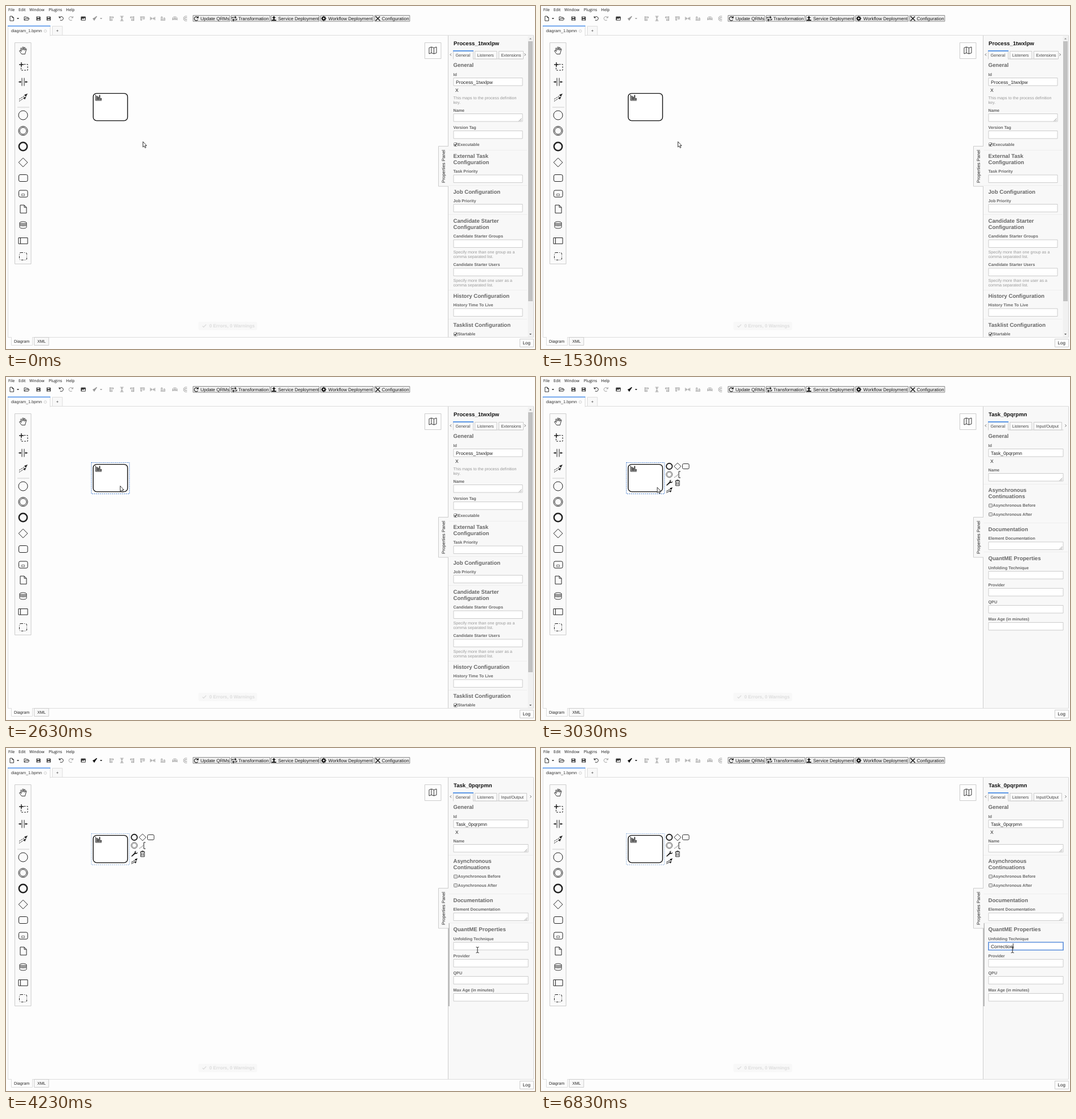
These frames come from a looping animation (929x603 px, 7.06 s). An HTML page with a canvas:

```html
<!DOCTYPE html>
<html>
<head>
<meta charset="utf-8">
<style>
html, body { margin: 0; width: 100%; height: 100%; overflow: hidden; background: #fdfdfd; }
canvas { display: block; }
</style>
</head>
<body>
<canvas id="stage" width="929" height="603"></canvas>
<script>
const ctx = document.getElementById('stage').getContext('2d');
ctx.textRendering = 'geometricPrecision';
const LOOP = 7060, SELECT = 2830, FOCUS = 4600;
const TYPED = 'Correction';
const KEY_TIMES = [5300, 5530, 5600, 5800, 6000, 6170, 6370, 6500, 6600, 6770];
const SANS = '"Liberation Sans", Arial, sans-serif';
const BLUE = '#4d90ea';

function text(str, x, y, { size = 7.2, color = '#333', bold = false, font = SANS } = {}) {
  ctx.font = `${bold ? 'bold ' : ''}${size}px ${font}`;
  ctx.fillStyle = color;
  ctx.fillText(str, x, y + size * 0.36);
}

function box(x, y, w, h, { fill, stroke, line = 1, radius = 0, dash = [] } = {}) {
  ctx.beginPath();
  ctx.roundRect(x, y, w, h, radius);
  if (fill) { ctx.fillStyle = fill; ctx.fill(); }
  if (!stroke) return;
  ctx.strokeStyle = stroke;
  ctx.lineWidth = line;
  ctx.setLineDash(dash);
  ctx.stroke();
  ctx.setLineDash([]);
}

function icon(x, y, d, { stroke = '#222', fill, line = 1, dash = [] } = {}) {
  const path = new Path2D(d);
  ctx.save();
  ctx.translate(x, y);
  if (fill) { ctx.fillStyle = fill; ctx.fill(path); }
  if (line) {
    ctx.strokeStyle = stroke;
    ctx.lineWidth = line;
    ctx.setLineDash(dash);
    ctx.stroke(path);
  }
  ctx.restore();
}

const solid = (x, y, d, fill = '#222') => icon(x, y, d, { fill, line: 0 });

function ring(x, y, r, line = 1, stroke = '#222') {
  ctx.beginPath();
  ctx.arc(x, y, r, 0, 7);
  ctx.strokeStyle = stroke;
  ctx.lineWidth = line;
  ctx.stroke();
}

const diamond = r => `M0 ${-r}L${r} 0L0 ${r}L${-r} 0Z`;
const CARET = 'M-2 -1H2L0 1.2Z';
const WRENCH = 'M-5 4L1 -2Q0 -5 4 -5L2 -3L4 -1L6 -3Q6 1 2 0L-4 5Z';

function drawMenuAndToolbar(selected) {
  [['File', 4], ['Edit', 22], ['Window', 41], ['Plugins', 75], ['Help', 105.5]].forEach(([label, x]) =>
    text(label, x, 6, { size: 7, color: '#111', font: '"Open Sans", sans-serif' }));

  icon(10, 22, 'M-3 -4H1L3.5 -1.5V4H-3ZM1 -4V-1.5H3.5', { line: 0.9 });
  solid(21, 22, CARET);
  icon(36, 22, 'M-4 3V-3H-1L0 -2H3V0M-4 3L-2 0H5L3 3Z', { line: 0.9 });
  for (const x of [57, 75]) {
    solid(x, 22, 'M-3.5 -3.5H2.5L3.5 -2.5V3.5H-3.5Z', '#333');
    solid(x, 22, 'M-2 -2.7H1.5V-.8H-2ZM-2 1H2V2.8H-2Z', '#ddd');
  }
  const undo = 'M-3 -1.5A3.4 3.4 0 1 1 -2 2.6M-3.6 -4V-1.2H-.8';
  icon(97, 22, undo);
  ctx.save();
  ctx.translate(114, 22);
  ctx.scale(-1, 1);
  icon(0, 0, undo, { stroke: '#999' });
  ctx.restore();
  box(131.5, 18.5, 8.5, 7, { fill: '#333', radius: 1 });
  solid(136, 22, 'M-3.5 2.5L-1.5 -.5L0 1L2 -1.5L3.5 2.5Z', '#fff');
  const brush = selected ? '#111' : '#999';
  solid(156, 22, 'M-4 0L0 -2L3 -4.5L4 -3.5L1.5 0L-1 4Z', brush);
  solid(167, 22, CARET, brush);

  const faint = { stroke: '#999', line: 0.9 };
  ['M-3 -4V4M-3 -3H3V-1H-3M-3 1.5H1V3.5H-3', 'M-3 -4H3M-3 4H3M-2 -2H2M-2 2H2M0 -4V4',
   'M3 -4V4M3 -3H-3V-1H3M3 1.5H-1V3.5H3', 'M-4 -3H4M-3 -3V3H-1V-3M1.5 -3V1H3.5V-3',
   'M-4 -3V3M4 -3V3M-2 -2V2M2 -2V2M-4 0H4', 'M-4 3H4M-3 3V-3H-1V3M1.5 3V-1H3.5V3']
    .forEach((d, i) => icon(185.5 + i * 18, 22, d, faint));
  icon(296.5, 22, 'M-4 3V-1L-2 -3H2L4 -1V3M-1.5 3V-1H1.5V3M-4 1H4', faint);
  icon(315, 22, 'M3 -4H-1L-3 -2V2L-1 4H3M3 -1.5H-1V1.5H3', faint);

  [[328.5, 64.5, 'Update QRMs', 341.5], [395.5, 68, 'Transformation', 408], [465.5, 84.5, 'Service Deployment', 478],
   [552.5, 92.5, 'Workflow Deployment', 566], [647.5, 61.5, 'Configuration', 660]].forEach(([x, w, label, tx]) => {
    box(x, 16.5, w, 10.5, { fill: '#efefef', stroke: '#8a8a8a' });
    text(label, tx, 22, { size: 8, color: '#111' });
  });
  icon(334, 22, 'M3 -1.5A3.4 3.4 0 1 0 3 2M3.6 -4V-1.2H.8', { line: 1.2 });
  icon(401, 22, 'M-4 0V-2H3M1 -4L3 -2L1 0M4 0V2.5H-3M-1 .5L-3 2.5L-1 4.5', { line: 1.2 });
  solid(470.5, 22, 'M0 -4.5L3.3 -1H1.2V2H-1.2V-1H-3.3ZM-4 2H4V4H-4Z');
  ring(558, 22, 2.4, 2, '#111');
  icon(558, 22, 'M0 -4.5V-2.5M0 4.5V2.5M-4.5 0H-2.5M4.5 0H2.5M-3 -3L-2 -2M3 3L2 2M-3 3L-2 2M3 -3L2 -2', { line: 1.7 });
  icon(653, 22, 'M-4 -4L4 4M-4 4L3.5 -3.5', { line: 1.6 });
}

function drawFrame() {
  box(3.5, 51.5, 923, 531, { stroke: '#ddd' });
  box(3.5, 35.5, 74, 17, { fill: '#fdfdfd', stroke: '#ddd' });
  box(3, 34.5, 75, 1.6, { fill: BLUE });
  box(4, 51, 73, 2, { fill: '#fdfdfd' });
  text('diagram_1.bpmn', 9, 43.5);
  ring(69, 44, 2.2, 0.7, '#bbb');
  box(81.5, 35.5, 17.5, 16, { fill: '#f8f8f8', stroke: '#ddd' });
  text('+', 88, 43.5, { size: 7.5 });

  box(9.5, 582.5, 37, 14, { fill: '#fdfdfd', stroke: '#ddd' });
  box(10, 581.5, 36, 2, { fill: '#fdfdfd' });
  text('Diagram', 14, 589.5, { color: '#222' });
  box(49.5, 582.5, 25.5, 14, { fill: '#f8f8f8', stroke: '#ccc' });
  text('XML', 55, 589.5, { color: '#222' });
  box(902.5, 585.5, 24, 14, { fill: '#fdfdfd', stroke: '#ccc' });
  text('Log', 907.5, 592.5, { size: 8, color: '#222' });

  box(338, 555, 103, 15, { fill: '#f8f8f8', radius: 3 });
  icon(348, 562.5, 'M-3 0L-1 2L3.5 -2.5', { stroke: '#ddd', line: 1.5 });
  text('0 Errors, 0 Warnings', 357, 562.5, { size: 8.2, color: '#ddd', bold: true });

  box(735.5, 64.5, 28.5, 28, { fill: '#fdfdfd', stroke: '#ccc' });
  icon(749.5, 78, 'M-6.5 -4.5L-2.5 -6L2 -4.5L6.5 -6V4.5L2 6L-2.5 4.5L-6.5 6ZM-2.5 -6V4.5M2 -4.5V6', { line: 0.9 });
}

function drawPalette() {
  box(15.5, 64.5, 28.5, 389, { fill: '#fafafa', stroke: '#ccc' });
  const x = 30;
  icon(x, 78, 'M-2.5 6.5L-6.5 1Q-6 -1 -4 .5L-3 2L-4.5 -3.5Q-3.5 -5.5 -2.5 -3.5L-1.5 -.5L-1 -5.5Q0 -7 .8 -5.5V-.7L2 -5Q3.4 -6 3.6 -4.5L3 0L4.5 -2.5Q6 -3.5 6 -2L4 4L3.5 6.5Z', { line: 0.9 });
  icon(x, 106, 'M-3.5 -3.5H8V7H-3.5Z', { line: 1, dash: [3, 2] });
  icon(x, 106, 'M-3 -7V1M-7 -3H1', { line: 1.4 });
  icon(x, 133.5, 'M-2 -7V7M2 -7V7M-8 0H-3M8 0H3', { line: 1 });
  solid(x, 133.5, 'M-3 0L-6 -2V2ZM3 0L6 -2V2Z');
  icon(x, 161, 'M-7 3L4 -4M-7 6.5L3 0', { line: 0.9, dash: [3, 1] });
  solid(x, 161, 'M8 -7L5 -1.5L2 -5ZM5.5 -1.5L3 3.5L.5 0Z');
  box(20, 177.5, 21, 1, { fill: '#ccc' });
  ring(x, 192, 8);
  ring(x, 219.5, 8);
  ring(x, 219.5, 6);
  ring(x, 247, 7.2, 2.5);
  icon(x, 275, diamond(7.8));
  box(22.5, 296.5, 15.5, 12, { stroke: '#222', radius: 2.5 });
  box(22.5, 324, 15.5, 12, { stroke: '#222', radius: 2.5 });
  box(27.5, 330.5, 5, 3, { stroke: '#555', line: 0.8 });
  icon(x, 357, 'M-5 -7H2L6 -3V7H-5ZM2 -7V-3H6');
  icon(x, 385, 'M-6 -4Q-6 -6 0 -6T6 -4V4Q6 6 0 6T-6 4ZM-6 -4Q-6 -2.5 0 -2.5T6 -4M-6 -2Q-6 -.5 0 -.5T6 -2M-6 0Q-6 1.5 0 1.5T6 0', { line: 0.9 });
  box(22, 407.5, 16, 10.5, { stroke: '#222' });
  box(25, 407.5, 1, 10.5, { fill: '#222' });
  box(23.5, 433.5, 13, 13, { stroke: '#222', radius: 2.5, dash: [4, 2, 1, 2] });
}

function drawTask(selected, hovered) {
  box(153.2, 153.6, 60.3, 48, { fill: '#fff', stroke: '#111', line: 1.4, radius: 6 });
  icon(162.5, 161, 'M-5 -5V5H5.5', { line: 1 });
  icon(162.5, 161, 'M-2.8 4V-3M-.4 4V-1.5M2 4V-4.5M4.4 4V1', { line: 1.7 });
  if (selected || hovered)
    box(150, 150.5, 66.8, 54.8, { stroke: hovered ? '#3f78cc' : '#8fb2de', dash: [2, 1.5] });
  if (!selected) return;
  ring(225.3, 157, 5.2, 1.9);
  icon(239.8, 157, diamond(6), { line: 0.9 });
  box(248.5, 152.5, 11.5, 9, { stroke: '#333', radius: 2 });
  ring(225.3, 171.3, 5.5, 0.9, '#555');
  ring(225.3, 171.3, 4, 0.9, '#777');
  icon(240, 171.5, 'M5 -5.5H2V5.5H5');
  icon(240, 171.5, 'M-5.5 5L2 -1', { dash: [1.5, 1.5] });
  solid(225, 186, WRENCH, '#111');
  icon(239.8, 186, 'M-4 -3.5H4M-1.5 -3.5V-5H1.5V-3.5M-3.3 -3.5V5H3.3V-3.5M-1.3 -1.5V3.5M1.3 -1.5V3.5', { line: 1 });
  icon(225, 199, 'M-5 2L3 -2.5M-5 4.5L2 1');
  solid(225, 199, 'M6 -5L4 -.5L1 -3.5ZM4.5 0L2.5 4L.5 1Z', '#111');
}

const PROCESS = {
  title: 'Process_1twxlpw', tab: 'Extensions', tabWidth: 43, width: 121,
  headings: [['General', 104], ['External Task', 264], ['Configuration', 275], ['Job Configuration', 326.5],
    ['Candidate Starter', 378], ['Configuration', 388.5], ['History Configuration', 509.5], ['Tasklist Configuration', 561]],
  fields: [['Id', 120], ['Name', 183], ['Version Tag', 213], ['Task Priority', 290.5], ['Job Priority', 342],
    ['Candidate Starter Groups', 404.5], ['Candidate Starter Users', 454.5], ['History Time To Live', 525.5]],
  areas: ['Name'],
  help: [['This maps to the process definition', 161], ['key.', 169], ['Specify more than one group as a', 432],
    ['comma separated list.', 440], ['Specify more than one user as a', 482], ['comma separated list.', 490]],
  checks: [['Executable', 243, true], ['Startable', 576.5, true]],
  rules: [253, 315, 366, 499, 550],
};
const TASK = {
  title: 'Task_0pqrpmn', tab: 'Input/Output', tabWidth: 49, width: 131,
  headings: [['General', 104], ['Asynchronous', 199], ['Continuations', 210], ['Documentation', 268], ['QuantME Properties', 319]],
  fields: [['Id', 120], ['Name', 163], ['Element Documentation', 283.5], ['Unfolding Technique', 335], ['Provider', 365],
    ['QPU', 395], ['Max Age (in minutes)', 425]],
  areas: ['Name', 'Element Documentation'],
  help: [],
  checks: [['Asynchronous Before', 225.5, false], ['Asynchronous After', 241, false]],
  rules: [188, 256, 307],
};

function drawPanel(view, t, groupHovered) {
  const left = 785.5, label = { bold: true, color: '#666' };
  ctx.save();
  ctx.beginPath();
  ctx.rect(776, 52, 150.5, 530);
  ctx.clip();
  box(776.5, 51.5, 150, 531, { fill: '#f8f8f8', stroke: '#ccc' });
  for (const y of view.rules) box(777, y, view.width + 17, 1, { fill: '#eee' });

  text(view.title, 786, 66, { size: 9.6, bold: true, color: '#111' });
  box(left, 92.5, view.width + 1, 1, { fill: '#ccc' });
  [['General', left, 35], ['Listeners', 823.5, 38.5], [view.tab, 865.5, view.tabWidth]].forEach(([name, x, w], i) => {
    box(x, 79.5, w, 13.5, { fill: i ? '#fafafa' : '#f8f8f8', stroke: '#ccc' });
    text(name, x + 4, 86.5, { color: '#444' });
  });
  box(786, 92, 34, 2, { fill: '#f8f8f8' });
  box(785, 78, 36, 1.7, { fill: BLUE });
  icon(781, 85.5, 'M1 -2L-1 0L1 2', { stroke: '#555', line: 0.9 });
  icon(view === TASK ? 921.5 : 911.5, 85.5, 'M-1 -2L1 0L-1 2', { stroke: '#555', line: 0.9 });

  for (const [str, y] of view.headings) text(str, left, y, { size: 9.6, ...label });
  for (const [str, y] of view.help) text(str, left, y, { color: '#999' });
  for (const [name, y] of view.fields) {
    text(name, left, y, label);
    box(left + 0.5, y + 6.5, view.width, 13.5, { fill: '#fff', stroke: '#ccc' });
    if (view.areas.includes(name))
      icon(left + view.width - 2, y + 17.5, 'M-4 2L1 -3M-1.5 2L1 -.5', { stroke: '#888', line: 0.8 });
  }
  text(view.title, 790, 133.5, { size: 8.4, color: '#222' });
  text('X', 789, 147.5, { size: 8.4, color: '#222' });
  for (const [name, y, checked] of view.checks) {
    box(786.5, y - 2.5, 6, 6, { fill: checked ? '#fff' : '#ddd', stroke: '#888', radius: 1 });
    if (checked) icon(789.5, y + 0.5, 'M-2 0L-.5 1.7L2.3 -2', { stroke: '#222', line: 1.2 });
    text(name, 793.5, y, label);
  }
  if (view === PROCESS) {
    box(916.5, 53, 9.5, 529, { fill: '#f1f1f1' });
    box(917, 62, 8, 457, { fill: '#c1c1c1' });
    solid(921, 57.5, 'M-2 1H2L0 -1.2Z', '#888');
    solid(921, 577, CARET, '#555');
  }
  if (groupHovered) box(776.5, 308, 2.5, 146, { fill: '#bbb' });
  if (t >= FOCUS) drawTyping(t);
  ctx.restore();

  box(759.5, 246.5, 17, 70.5, { fill: '#f8f8f8', stroke: '#ccc' });
  box(776, 247, 1.5, 69.5, { fill: '#f8f8f8' });
  ctx.save();
  ctx.translate(768, 311);
  ctx.rotate(-Math.PI / 2);
  text('Properties Panel', 0, 0, { size: 7.85, color: '#222' });
  ctx.restore();
}

function drawTyping(t) {
  ctx.globalAlpha = Math.min(1, (t - FOCUS + 40) / 120);
  box(786, 341.5, 131, 13.8, { fill: '#fff', stroke: '#5c8fdc', line: 1.6 });
  ctx.globalAlpha = 1;
  const count = KEY_TIMES.filter(key => key <= t).length;
  const str = TYPED.slice(0, count);
  text(str, 790, 348.5, { size: 8.4, color: '#222' });
  const lastInput = count ? KEY_TIMES[count - 1] : FOCUS;
  if ((t - lastInput) % 1000 < 500) box(790 + ctx.measureText(str).width, 343.5, 0.9, 10, { fill: '#111' });
}

function travel(t, start, end, from, to) {
  const p = Math.min(1, Math.max(0, (t - start) / (end - start)));
  const eased = p * p * (3 - 2 * p);
  return from.map((v, i) => v + (to[i] - v) * eased);
}

function pointerAt(t) {
  if (t < 2500) return travel(t, 1560, 2300, [240, 238], [200, 191]);
  if (t < 3000) return travel(t, 2700, 3000, [200, 191], [202, 193]);
  return travel(t, 3000, 4040, [202, 193], [828, 355]);
}

function drawPointer(x, y) {
  if (x > 785 && y > 341)
    icon(x, y, 'M-2.5 -5Q0 -5 0 -4Q0 -5 2.5 -5M0 -4V4M-2.5 5Q0 5 0 4Q0 5 2.5 5', { stroke: '#222', line: 1 });
  else
    icon(x, y, 'M.5 .5V10L2.7 8L4.2 11.5L5.8 10.8L4.3 7.5H7Z', { fill: '#fff', stroke: '#222', line: 0.9 });
}

function render(now) {
  const t = now % LOOP;
  const [x, y] = pointerAt(t);
  const selected = t >= SELECT;
  const hovered = x > 153 && x < 214 && y > 153 && y < 202;
  box(0, 0, 929, 603, { fill: '#fdfdfd' });
  drawMenuAndToolbar(selected);
  drawFrame();
  drawPalette();
  drawTask(selected, hovered);
  drawPanel(selected ? TASK : PROCESS, t, x > 777 && y > 307);
  drawPointer(x, y);
}

const begin = performance.now();
function tick() {
  render(performance.now() - begin);
  requestAnimationFrame(tick);
}
tick();
</script>
</body>
</html>
```
